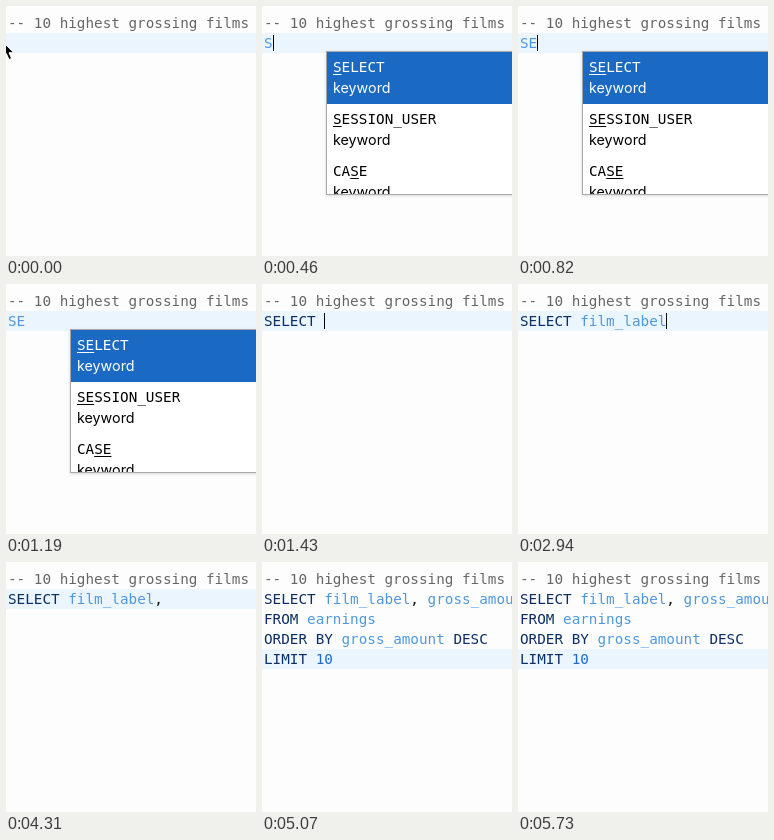
An HTML page that plays this animation: 250 by 250 pixels, repeating every 5760 ms.

```html
<!DOCTYPE html>
<html lang="en">
<head>
<meta charset="utf-8">
<title>SQL editor</title>
<style>
  html, body { margin: 0; width: 100%; height: 100%; overflow: hidden; background: #fdfdfd; }
  .layer { position: absolute; inset: 0; overflow: hidden; background: #fdfdfd;
    font: 14.3px/20px "DejaVu Sans Mono", monospace; }
  .line { position: absolute; left: 0; width: 100%; height: 20px; padding-left: 2px; white-space: pre; }
  .active { background: #ebf5fd; }
  .comment { color: #666; }
  .keyword { color: #0b2e66; }
  .number { color: #1c6bd0; }
  .name { color: #4f98dd; }
  .mark { color: #111; }
  .caret { position: absolute; top: 29px; width: 1px; height: 16px; background: #000; }
  .popup { position: absolute; top: 45px; width: 260px; height: 143px; overflow: hidden; color: #000;
    background: #fff; border: 1px solid #a8a8a8; box-sizing: content-box; height: 142px;
    box-shadow: 0 1px 3px rgba(0, 0, 0, .15); }
  .item { box-sizing: border-box; height: 52px; padding: 5px 0 0 6px; white-space: pre; }
  .item:first-child { background: #1a6ac3; color: #fff; }
  .item div { margin-top: 1px; font-family: Inter, sans-serif; }
  u { text-underline-offset: 2px; }
  svg { position: absolute; left: 0; top: 0; }
</style>
</head>
<body>
<div class="layer" id="typing"></div>
<div class="layer" id="result"></div>
<svg id="pointer" width="250" height="250">
  <path transform="translate(-3 36)" d="M0 0V14.5L3.3 11.5L6 17.5L8.6 16.4L6 10.7H10.8Z" stroke="#fff"/>
</svg>
<script>
const LOOP = 5760, CHAR = 8.609, LEFT = 2, BLINK = 500;
const COMMENT = '-- 10 highest grossing films';
const RESULT = ['SELECT film_label, gross_amount', 'FROM earnings', 'ORDER BY gross_amount DESC', 'LIMIT 10'];
const FADE = [4340, 4760];

// [time, text of the edited line]
const keys = [[60, 'S'], [640, 'SE'], [1220, 'SELECT'], [1340, 'SELECT ']];
const addKeys = (text, times) => times.forEach((time, i) =>
  keys.push([time, keys[keys.length - 1][1] + text[i]]));
addKeys('film_label,', [1610, 1720, 1820, 2000, 2080, 2200, 2290, 2370, 2460, 2540, 3610]);

const popups = [
  { from: 150, to: 1220, column: 0, kind: 'keyword', items: ['SELECT', 'SESSION_USER', 'CASE'] },
  { from: 1650, to: 2000, column: 7, kind: 'function', items: ['FAMILY', 'FACTORIAL', 'FIRST_VALUE'] }
];

const byId = id => document.getElementById(id);

function tokenClass(token) {
  if (/^(SELECT|FROM|ORDER|BY|DESC|LIMIT)$/.test(token)) return 'keyword';
  if (/^\d/.test(token)) return 'number';
  return /^\w/.test(token) ? 'name' : 'mark';
}

const highlight = text => text.replace(/\w+|[^\w\s]/g,
  token => `<span class="${tokenClass(token)}">${token}</span>`);

function editor(lines, active) {
  const row = (html, i, type = '') => `<div class="line ${type}" style="top:${7 + 20 * i}px">${html}</div>`;
  return row(COMMENT, 0, 'comment') +
    lines.map((text, i) => row(highlight(text), i + 1, i === active ? 'active' : '')).join('');
}

// Underline the letters of the query in order of appearance
function underline(word, query) {
  let next = 0;
  return word.replace(/./g, c => c === query[next] ? (next++, `<u>${c}</u>`) : c)
    .replace(/<\/u><u>/g, '');
}

function popupHtml({ column, kind, items }, text) {
  const query = text.slice(column).toUpperCase();
  const left = Math.round(LEFT + column * CHAR) + 62;
  return `<div class="popup" style="left:${left}px">` + items.map(word =>
    `<div class="item">${underline(word, query)}<div>${kind}</div></div>`).join('') + '</div>';
}

function typingHtml(t) {
  const [time, text] = keys.filter(key => key[0] <= t).pop() || [0, ''];
  const caretOn = text && Math.floor((t - time) / BLINK) % 2 === 0;
  const popup = popups.find(p => t >= p.from && t < p.to);
  return editor([text], 0) +
    (caretOn ? `<div class="caret" style="left:${Math.round(LEFT + text.length * CHAR)}px"></div>` : '') +
    (popup ? popupHtml(popup, text) : '');
}

let shown;
function draw(now) {
  const t = now % LOOP;
  const html = typingHtml(t);
  if (html !== shown) byId('typing').innerHTML = shown = html;
  byId('result').style.opacity = Math.min(1, Math.max(0, (t - FADE[0]) / (FADE[1] - FADE[0])));
  byId('pointer').style.display = t < keys[0][0] ? '' : 'none';
}

byId('result').innerHTML = editor(RESULT, 3);
const start = performance.now();
function tick() {
  draw(performance.now() - start);
  requestAnimationFrame(tick);
}
tick();
</script>
</body>
</html>
```
